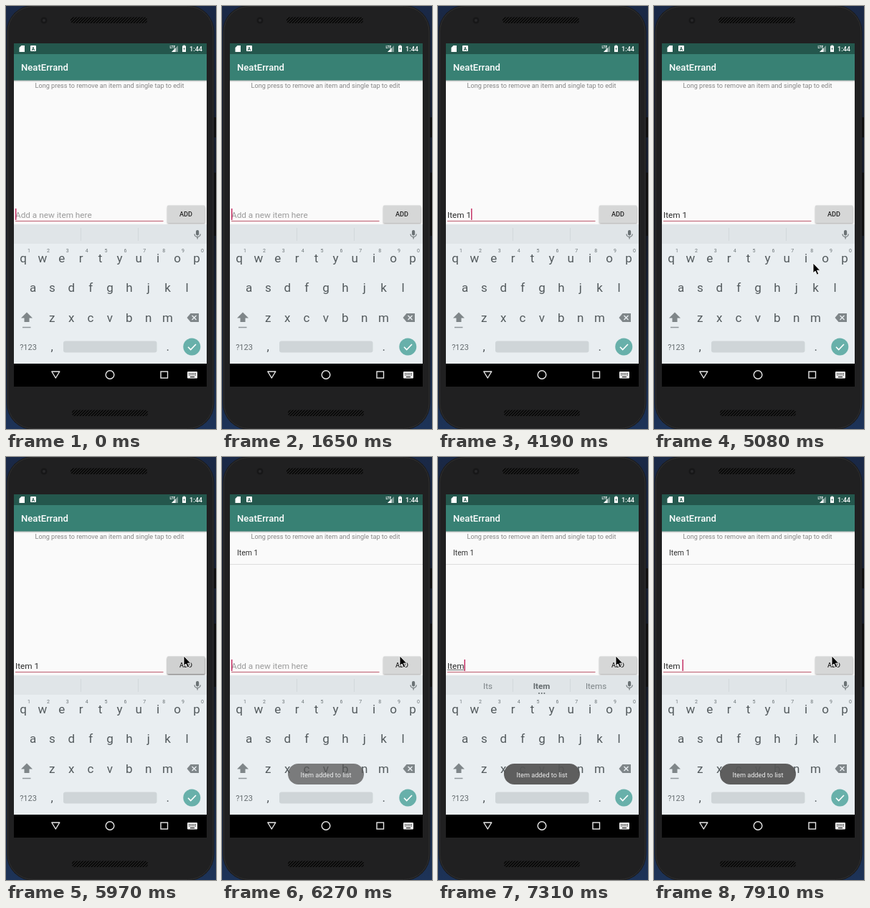
Write an HTML page that moves like this. It is 293x589 px and loops after 8 s.

```html
<!DOCTYPE html>
<html lang="en">
<head>
<meta charset="utf-8">
<title>To-do list demo</title>
<style>
  html, body { margin: 0; width: 100%; height: 100%; overflow: hidden; background: #17233d; }
  svg { display: block; width: 100%; height: 100%; }
  text { font-family: Roboto, sans-serif; white-space: pre; }
  .mid { text-anchor: middle; }
  .medium { font-weight: 500; }
  .small { font-size: 9.17px; }
  .field { font-size: 11.78px; }
  .key { font-size: 17px; fill: #535a5d; }
  .digit { font-size: 7px; fill: #6c7477; }
  .word { font-size: 11.6px; fill: #7b8285; }
</style>
</head>
<body>
<svg viewBox="0 0 293 589">
  <defs>
    <linearGradient id="desk" x2="0" y2="1">
      <stop stop-color="#1a2947"/><stop offset=".5" stop-color="#121722"/><stop offset="1" stop-color="#1d3358"/>
    </linearGradient>
    <linearGradient id="shade" x2="0" y2="1">
      <stop stop-opacity=".3"/><stop offset="1" stop-opacity="0"/>
    </linearGradient>
    <pattern id="mesh" width="4" height="4" patternUnits="userSpaceOnUse">
      <rect width="4" height="4" fill="#0b0b0b"/>
      <path d="M0 4L4 0" stroke="#303030" stroke-width=".9"/>
    </pattern>
    <filter id="blur" x="-20%" y="-40%" width="140%" height="180%"><feGaussianBlur stdDeviation="1.1"/></filter>
  </defs>

  <!-- phone -->
  <rect width="293" height="589" fill="url(#desk)"/>
  <path d="M291 155v28M291 232v88" stroke="#0d0d0e" stroke-width="4"/>
  <rect x="1" y="-1" width="289.5" height="591" rx="37" fill="#1b1b1c"/>
  <rect x="2.5" y=".5" width="286.5" height="588" rx="35.5" fill="#202021" stroke="#303031"/>
  <rect x="90" y="15.5" width="107" height="8.5" rx="4" fill="url(#mesh)"/>
  <rect x="92" y="562.5" width="106" height="8.5" rx="4" fill="url(#mesh)"/>
  <circle cx="53" cy="20" r="4.5" fill="#171718"/>
  <circle cx="53" cy="20" r="2" fill="#29292b"/>

  <!-- app -->
  <rect x="11" y="52" width="269" height="478" fill="#fafafa"/>
  <rect x="11" y="103" width="269" height="3" fill="url(#shade)"/>
  <rect x="11" y="52" width="269" height="15" fill="#24574d"/>
  <rect x="11" y="67" width="269" height="36.5" fill="#388174"/>
  <g fill="#fff">
    <path d="M21.5 55H26v9h-7.500v-6z"/>
    <rect x="34" y="55" width="8" height="8" rx="1"/>
    <text x="38" y="61.500" class="mid" font-size="6.500" font-weight="700" style="fill:#24574d">A</text>
    <text x="228.500" y="58.500" font-size="4.800" font-weight="700">LTE</text>
    <path d="M240 55v9h-9z" opacity=".4"/>
    <path d="M236.500 58.500V64H231z"/>
    <path d="M247.500 54.500h2v1h1.500V64h-5v-8.500h1.500z"/>
    <path d="M249 57l-1.500 3h1l-.5 2.500 1.700-3.300h-1z" fill="#24574d"/>
    <text x="256" y="63" class="small medium">1:44</text>
    <text x="21" y="90" class="medium" font-size="13.100">NeatErrand</text>
  </g>
  <text x="144.500" y="113.700" class="mid small" fill="#858585">Long press to remove an item and single tap to edit</text>
  <g id="entry">
    <text x="21" y="137" font-size="10.470" fill="#333">Item 1</text>
    <path d="M11 149.500h269" stroke="#dedede"/>
  </g>

  <!-- input row -->
  <text id="hint" x="13" y="294.500" class="field" fill="#9a9a9a">Add a new item here</text>
  <text id="typed" x="13" y="294.500" class="field" fill="#2b2b2b"></text>
  <path id="composing" stroke="#444" stroke-width=".8"/>
  <path d="M13 299.500h206.500" stroke="#bd5b6d" stroke-width="1.200"/>
  <rect id="caret" y="282" width="1.400" height="16" fill="#c2255c"/>
  <rect id="lift" x="225" y="279" width="53" height="24.500" rx="1.500" filter="url(#blur)"/>
  <rect id="button" x="225" y="277.500" width="52.500" height="24.500" rx="1.500"/>
  <text x="251" y="293.200" class="mid small medium" fill="#242424">ADD</text>

  <!-- keyboard -->
  <rect x="11" y="304" width="269" height="28" fill="#e0e5e8"/>
  <rect x="11" y="331" width="269" height="167" fill="#e9eef1"/>
  <path d="M104.500 309v18M184.500 309v18" stroke="#d2d8db"/>
  <g id="words" class="mid">
    <text x="69.500" y="322.700" class="word"></text>
    <text x="144.500" y="322.700" class="word" font-weight="700" style="fill:#656c6f"></text>
    <text x="220.500" y="322.700" class="word"></text>
    <path d="M141 329h0M144.700 329h0M148.400 329h0" stroke="#656c6f" stroke-width="2" stroke-linecap="round"/>
  </g>
  <g fill="none" stroke="#6b7275" stroke-width="1.200">
    <rect x="265.600" y="312.600" width="3" height="6.500" rx="1.500" fill="#6b7275"/>
    <path d="M263 317.500a4.100 4.100 0 0 0 8.200 0M267.100 321.500v3"/>
  </g>
  <g id="keys" class="mid"></g>
  <path d="M29 426.500l8 8h-4.500v5.500h-7v-5.500H21z" fill="#7f8689"/>
  <path d="M23 447.500h11.500" stroke="#8f9699" stroke-width="1.500"/>
  <path d="M257.500 428H269v12h-11.500l-5-6z" fill="#7f8689"/>
  <path d="M259.500 431l6 6m0-6l-6 6" stroke="#e9eef1" stroke-width="1.400"/>
  <text x="31" y="478.500" class="mid" font-size="11" fill="#656c6f">?123</text>
  <rect x="80" y="466.500" width="130.500" height="16" rx="3" fill="#cfd5d8"/>
  <circle cx="259.300" cy="474.500" r="12" fill="#68b0aa"/>
  <path d="M254 474.800l3.700 3.700 7.300-7.500" fill="none" stroke="#fff" stroke-width="1.600"/>

  <!-- navigation -->
  <rect x="11" y="498" width="269" height="32" fill="#000"/>
  <g fill="none" stroke="#e8e8e8" stroke-width="1.400">
    <path d="M63.800 509h11l-5.500 9z" stroke-linejoin="round"/>
    <circle cx="145" cy="513.500" r="5.800"/>
    <rect x="216" y="509" width="9.500" height="9"/>
  </g>
  <rect x="253" y="509" width="14" height="9.500" rx="1" fill="#eee"/>
  <path d="M255 511.700h10.500M255 513.800h10.500" stroke="#000" stroke-dasharray="1.200 1"/>
  <path d="M257 516.500h6" stroke="#000"/>

  <g id="toast">
    <rect x="92" y="427" width="106" height="29" rx="14.500" fill="#555" opacity=".94"/>
    <text x="145" y="445.500" class="mid small" fill="#ededed">Item added to list</text>
  </g>
  <path id="pointer" d="M0 0v13.800l3.100-2.700 2.300 5.100 2.400-1.100-2.300-4.900h4.300z" fill="#000" stroke="#fff" stroke-width=".9"/>
</svg>
<script>
const $ = id => document.getElementById(id);
const LOOP = 8000;

function addText(x, y, cls, content) {
  const node = document.createElementNS($('keys').namespaceURI, 'text');
  node.setAttribute('x', x);
  node.setAttribute('y', y);
  node.setAttribute('class', cls);
  node.textContent = content;
  $('keys').append(node);
}

const PITCH = 26.88;
[['qwertyuiop', 24, 357.3], ['asdfghjkl', 37.5, 398.3], ['zxcvbnm', 64.3, 439.5]].forEach(([row, x, y]) =>
  [...row].forEach((letter, i) => addText(x + i * PITCH, y, 'key', letter)));
[...'1234567890'].forEach((digit, i) => addText(32 + i * PITCH, 343, 'digit', digit));
addText(64.3, 480, 'key', ',');
addText(225.7, 480, 'key', '.');

// Typing "Item ": suggestions lag one key behind the text.
const typeWord = start => [
  [start, { text: 'I', composing: true, caret: true }],
  [start + 150, { text: 'It', words: ['I', "I'm", 'In'] }],
  [start + 300, { text: 'Ite', words: ['If', 'It', "It's"] }],
  [start + 450, { text: 'Item', words: ['Its', 'Item', 'Items'] }],
  [start + 600, { words: ['Items', 'Item', "Item's"] }],
  [start + 750, { text: 'Item ', composing: false }],
  [start + 1050, { words: null }]
];

// Each step changes only the listed properties.
const steps = [
  [0, { text: '', caret: true, composing: false, words: null, pointer: null, pressed: false, added: false, toast: 0 }],
  [150, { caret: false }],
  [600, { caret: true }],
  [1050, { caret: false }],
  [1650, { caret: true }],
  [2100, { caret: false }],
  [2540, { caret: true }],
  ...typeWord(2840),
  [4040, { caret: false }],
  [4190, { text: 'Item 1', caret: true }],
  [4790, { caret: false }],
  [4940, { pointer: [222, 358] }],
  [5090, { pointer: [235, 318] }],
  [5240, { pointer: [244, 285], caret: true }],
  [5380, { pointer: [248, 273] }],
  [5530, { pointer: [248, 277] }],
  [5680, { caret: false }],
  [5970, { pressed: true }],
  [6120, { text: '', caret: true, added: true, toast: .3 }],
  [6270, { pressed: false, toast: .8 }],
  [6420, { toast: 1 }],
  [6570, { caret: false }],
  ...typeWord(6860)
];

const show = (id, on) => $(id).setAttribute('visibility', on ? 'visible' : 'hidden');

function render(s) {
  $('typed').textContent = s.text;
  const end = 13 + (s.text ? $('typed').getComputedTextLength() : 0);
  $('caret').setAttribute('x', end);
  $('composing').setAttribute('d', `M13 296.500H${end}`);
  $('toast').setAttribute('opacity', s.toast);
  $('lift').setAttribute('opacity', s.pressed ? .5 : .28);
  $('button').setAttribute('fill', s.pressed ? '#d0d1d1' : '#d6d7d7');
  show('hint', !s.text);
  show('caret', s.caret);
  show('composing', s.composing);
  show('entry', s.added);
  show('words', s.words);
  if (s.words) s.words.forEach((word, i) => $('words').children[i].textContent = word);
  show('pointer', s.pointer);
  if (s.pointer) $('pointer').setAttribute('transform', `translate(${s.pointer})`);
}

const start = performance.now();
let current = -1;

function tick() {
  const t = (performance.now() - start) % LOOP;
  const count = steps.filter(([at]) => at <= t).length;
  if (count !== current) {
    current = count;
    render(Object.assign({}, ...steps.slice(0, count).map(([, change]) => change)));
  }
  requestAnimationFrame(tick);
}
tick();
</script>
</body>
</html>
```
